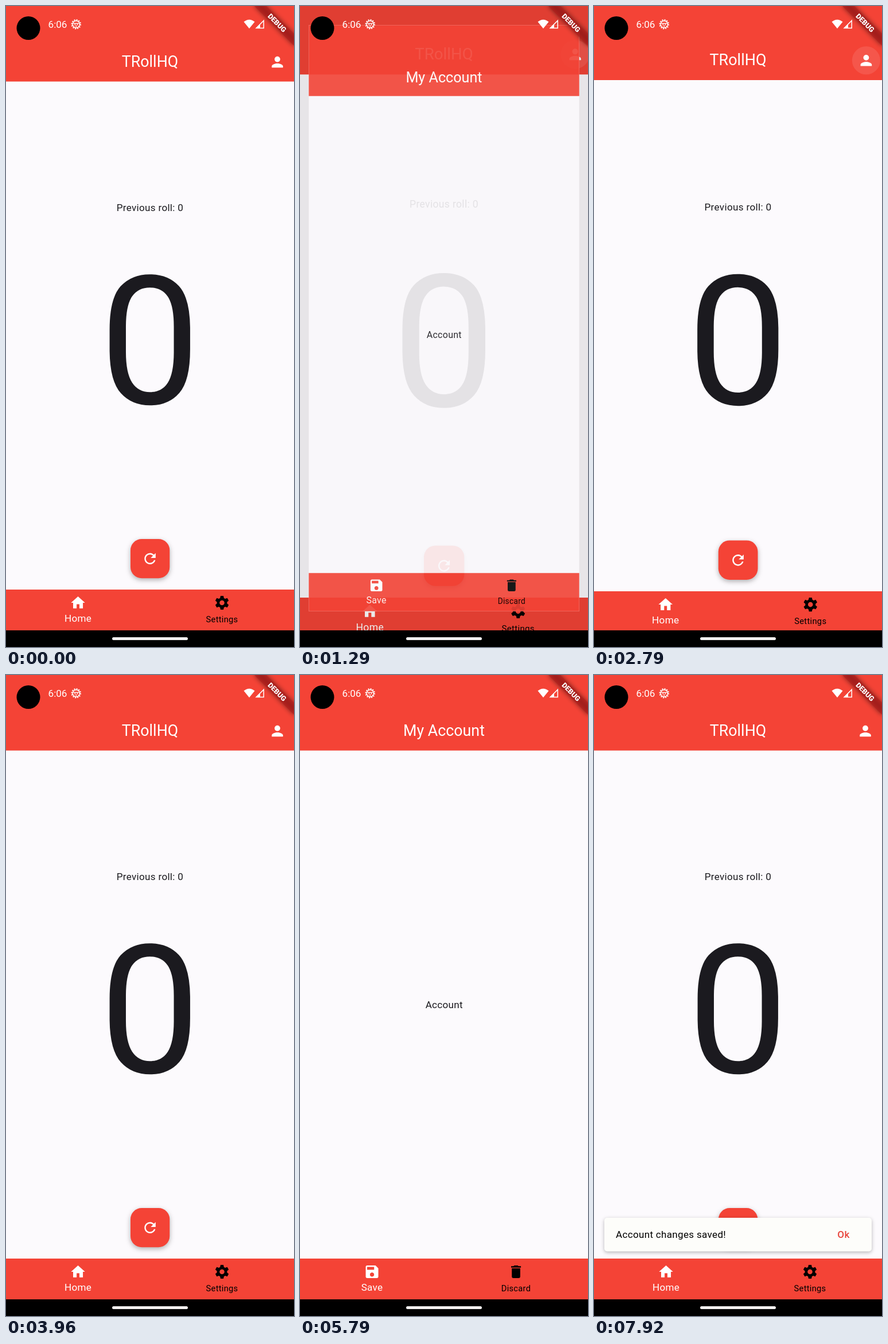
Animation of 502x1116 px, one loop 8000 ms. Source, as an HTML page:

```html
<!DOCTYPE html>
<html lang="en">
<head>
<meta charset="utf-8">
<title>Dice roller</title>
<style>
  html, body { margin: 0; width: 100%; height: 100%; overflow: hidden; background: #000; }
  svg { display: block; }
  text { font: 17.08px Roboto, sans-serif; letter-spacing: .3px; text-anchor: middle; fill: #1b1a1f; }
  .white, .white text { fill: #fff; }
  text.title { font-size: 26.8px; letter-spacing: 0; fill: #fff; }
  text.small { font-size: 14.64px; fill: #000; }
  .page { transform-origin: 251px 543.5px; }
  .fab { filter: drop-shadow(0 3px 4px rgba(0, 0, 0, .3)); }
  .card { filter: drop-shadow(0 2px 3px rgba(0, 0, 0, .28)); }
</style>
</head>
<body>
<svg width="502" height="1116" viewBox="0 0 502 1116">
  <defs>
    <radialGradient id="glow">
      <stop offset="0" stop-color="#c8c4c4" stop-opacity=".5"/>
      <stop offset=".51" stop-color="#c8c4c4" stop-opacity=".45"/>
      <stop offset=".54" stop-color="#c8c4c4" stop-opacity=".25"/>
      <stop offset="1" stop-color="#c8c4c4" stop-opacity="0"/>
    </radialGradient>
    <filter id="blur" x="-50%" y="-100%" width="200%" height="300%"><feGaussianBlur stdDeviation="4"/></filter>
    <clipPath id="reveal"><rect id="revealBox" width="502" height="90"/></clipPath>
    <g id="frame">
      <rect width="502" height="1087" fill="#fcfafd"/>
      <path d="M0 0H502V131.5H0zM0 1016H502V1087H0z" fill="#f44336"/>
    </g>
  </defs>

  <g id="home" class="page">
    <use href="#frame"/>
    <text class="title" x="251" y="106">TRollHQ</text>
    <circle id="press" cx="473" cy="97.5" r="24.4" fill="#fff"/>
    <path class="white" transform="translate(458.4 82.9) scale(1.22)" d="M12 12c2.21 0 4-1.79 4-4s-1.79-4-4-4-4 1.79-4 4 1.79 4 4 4zm0 2c-2.67 0-8 1.34-8 4v2h16v-2c0-2.66-5.33-4-8-4z"/>
    <text x="251" y="357">Previous roll: 0</text>
    <text x="251" y="692.3" style="font-size:312.4px">0</text>
    <rect class="fab" x="217" y="928" width="68.3" height="68.3" rx="19.5" fill="#f44336"/>
    <path class="white" transform="translate(236.4 947.6) scale(1.22)" d="M17.65 6.35C16.2 4.9 14.21 4 12 4c-4.42 0-7.99 3.58-7.99 8s3.57 8 7.99 8c3.73 0 6.84-2.55 7.73-6h-2.08c-.82 2.33-3.04 4-5.65 4-3.31 0-6-2.69-6-6s2.69-6 6-6c1.66 0 3.14.69 4.22 1.78L13 11h7V4l-2.35 2.35z"/>
    <path class="white" transform="translate(110.9 1024.4) scale(1.22)" d="M10 20v-6h4v6h5v-8h3L12 3 2 12h3v8z"/>
    <text class="white" x="125.5" y="1072">Home</text>
    <g id="gear" transform="translate(376.5 1039)"><circle r="6.6" fill="none" stroke="#000" stroke-width="4.6"/></g>
    <text class="small" x="376.5" y="1073">Settings</text>
    <g id="snack" clip-path="url(#reveal)">
      <g id="snackBody">
        <rect class="card" x="18" y="945" width="466" height="58.5" rx="5" fill="#fdfdfa"/>
        <text x="38" y="980" style="text-anchor:start;fill:#000">Account changes saved!</text>
        <text x="435" y="980" style="font-weight:500;fill:#e8443b">Ok</text>
      </g>
    </g>
  </g>

  <rect id="scrim" width="502" height="1087"/>

  <g id="account" class="page">
    <use href="#frame"/>
    <text class="title" x="251" y="106">My Account</text>
    <text x="251.3" y="580">Account</text>
    <svg id="tile" y="1016" width="251" height="71">
      <g id="splash"><circle r="84" fill="url(#glow)"/></g>
    </svg>
    <path class="white" transform="translate(110.9 1024.4) scale(1.22)" d="M17 3H5c-1.11 0-2 .9-2 2v14c0 1.1.89 2 2 2h14c1.1 0 2-.9 2-2V7l-4-4zm-5 16c-1.66 0-3-1.34-3-3s1.34-3 3-3 3 1.34 3 3-1.34 3-3 3zm3-10H5V5h10v4z"/>
    <text class="white" x="125.5" y="1072">Save</text>
    <path transform="translate(361.9 1024.4) scale(1.22)" d="M6 19c0 1.1.9 2 2 2h8c1.1 0 2-.9 2-2V7H6v12zM19 4h-3.5l-1-1h-5l-1 1H5v2h14V4z"/>
    <text class="small" x="376.5" y="1073">Discard</text>
  </g>

  <!-- system bars -->
  <rect y="1087" width="502" height="29"/>
  <rect x="185" y="1099" width="132" height="5" rx="2.5" fill="#f4f1f1"/>
  <circle cx="39" cy="38.5" r="20.5"/>
  <text class="white" x="90" y="38.3" style="letter-spacing:0">6:06</text>
  <g transform="translate(122.3 31.8)" fill="none" stroke="#fff">
    <circle r="6.1" stroke-width="1.5"/>
    <circle r="7.7" stroke-width="2" stroke-dasharray="2.1 1.93"/>
    <path d="M-5-1.5H5M-2-1.5V2M2-1.5V2M0 2V5" stroke-width="1.3"/>
  </g>
  <path class="white" d="M414.5 27.6Q424 20 433.5 27.6L424 39.2z"/>
  <path d="M449.2 25.4V38.4H436.2z" fill="none" stroke="#fff" stroke-width="1.5"/>
  <path class="white" d="M435 39L443 31V39z"/>
  <g transform="translate(502) rotate(45)">
    <rect x="-49" y="34.2" width="98" height="14.6" fill-opacity=".5" filter="url(#blur)"/>
    <rect x="-49" y="34.2" width="98" height="14.6" fill="#b71c1c" fill-opacity=".63"/>
    <text class="white" y="45.9" style="font-size:12.4px;font-weight:900;letter-spacing:0">DEBUG</text>
  </g>
</svg>
<script>
const $ = id => document.getElementById(id);
const LOOP = 8000, ZOOM = 300;
// each visit: press on the person icon, page opens, tile tapped, page closes
const VISITS = [
  { press: 1150, open: 1220, tap: 2510, close: 2640, tileX: 251 },
  { press: 5390, open: 5450, tap: 6700, close: 6870, tileX: 0 }
];
const SNACK = 6920;

const clamp = v => Math.min(1, Math.max(0, v));
const span = (v, a, b) => clamp((v - a) / (b - a));
const mix = (a, b, v) => a + (b - a) * v;

function bezier(x1, y1, x2, y2, x) {
  const at = (a, b, s) => 3 * (1 - s) ** 2 * s * a + 3 * (1 - s) * s * s * b + s ** 3;
  let lo = 0, hi = 1;
  for (let i = 0; i < 24; i++) {
    const mid = (lo + hi) / 2;
    if (at(x1, x2, mid) < x) lo = mid; else hi = mid;
  }
  return at(y1, y2, lo);
}

const zoomCurve = v => v < 1 / 6
  ? .4 * bezier(.05, 0, .1333, .06, v * 6)
  : .4 + .6 * bezier(.2083, .82, .25, 1, (v - 1 / 6) * 1.2);

const inOutQuart = v => bezier(.77, 0, .175, 1, v);

function add(parent, name, attrs) {
  const el = document.createElementNS('http://www.w3.org/2000/svg', name);
  for (const key in attrs) el.setAttribute(key, attrs[key]);
  parent.append(el);
}

for (let i = 0; i < 6; i++)
  add($('gear'), 'path', { d: 'M-3.6-7L-2.5-12H2.5L3.6-7z', transform: `rotate(${i * 60})` });

// grainy rim of the tap splash
let seed = 7;
const random = () => (seed = seed * 16807 % 2147483647) / 2147483647;
for (let i = 0; i < 260; i++) {
  const angle = random() * 2 * Math.PI, r = 43 + 40 * random() ** 1.7;
  add($('splash'), 'circle', {
    cx: r * Math.cos(angle), cy: r * Math.sin(angle), r: .6, fill: '#e0b0a8', opacity: .35
  });
}

function scale(id, value) { $(id).style.transform = `scale(${value})`; }
function fade(id, value) {
  $(id).style.opacity = value;
  $(id).style.display = value > 0 ? '' : 'none';
}

function draw(t) {
  const visit = VISITS.find(v => t < v.close + 600) || VISITS[1];
  const opening = span(t, visit.open, visit.open + ZOOM);
  const closing = span(t, visit.close, visit.close + ZOOM);
  const leaving = t >= visit.close;

  scale('home', leaving ? mix(1.1, 1, zoomCurve(closing)) : mix(1, 1.05, zoomCurve(opening)));
  scale('account', leaving ? mix(1, .9, zoomCurve(closing)) : mix(.85, 1, zoomCurve(opening)));
  fade('account', leaving ? 1 - span(closing, .0825, .2075) : span(opening, .125, .25));
  fade('scrim', leaving || opening === 1 ? 0 : .6 * span(opening, .2075, .4175));
  fade('press', .1 * span(t, visit.press, visit.press + 50)
    * (1 - span(t, visit.close + 160, visit.close + 300)));

  const age = span(t, visit.tap, visit.tap + 617);
  $('tile').setAttribute('x', visit.tileX);
  $('splash').setAttribute('transform', `translate(125.5 36) scale(${age / .21})`);
  fade('splash', Math.min(span(age, 0, .13), 1 - span(age, .4, 1)));

  const rise = span(t, SNACK, SNACK + 250);
  $('revealBox').setAttribute('y', 1016 - 90 * inOutQuart(rise));
  fade('snack', span(rise, .4, .6));
}

const start = performance.now();
function tick() {
  draw((performance.now() - start) % LOOP);
  requestAnimationFrame(tick);
}
tick();
</script>
</body>
</html>
```
